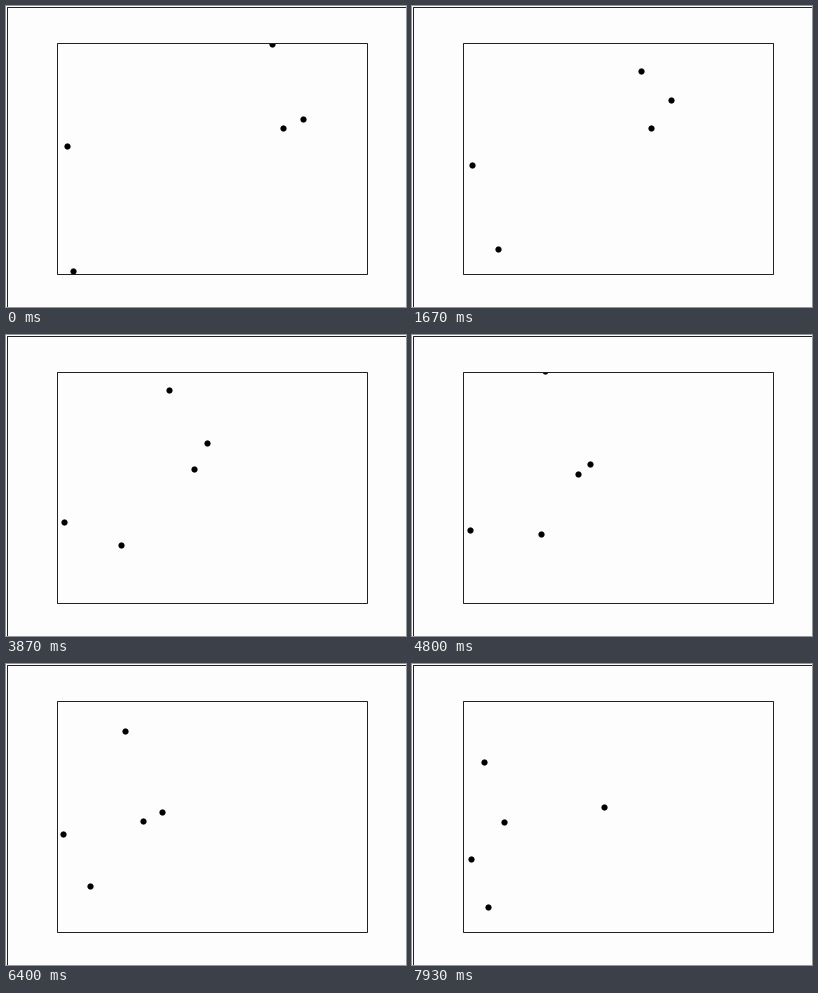
These frames come from a looping animation (400 by 301 pixels, 8 s). A matplotlib script:

```python
import numpy as np
import matplotlib.pyplot as plt
from matplotlib.animation import FuncAnimation
from matplotlib.patches import Rectangle

W, H, DPI = 400, 301, 64
FRAMES, LOOP_MS = 120, 8000
PAPER = "#fefdfe"


def pt(px):
    return px * 72 / DPI


# Straight flights between bounces: (step, position) for x and for y.
TRACKS = [
    ([(0, 265), (4.5, 261), (20, 228), (66, 127.8), (78, 139.5), (111, 69.5)],
     [(0, 37.5), (1, 36), (30.8, 80.5), (65.3, 34), (111, 98.5)]),
    ([(0, 296), (33, 233.5), (50, 200), (82.9, 147), (111, 193.5)],
     [(0, 112), (4.6, 113.8), (31.1, 79), (70, 137), (78, 139), (92, 150.6),
      (111, 142)]),
    ([(0, 276.5), (4.5, 264.2), (50, 187.5), (78, 142.5), (82.7, 147.8),
      (111, 89.5)],
     [(0, 121.5), (4.3, 116), (70, 141.1), (91, 158.5), (111, 157)]),
    ([(0, 60), (98, 56), (100.3, 50.7), (103.7, 58.3)],
     [(0, 139.5), (61.3, 197.4), (91, 166.8), (111, 195.5)]),
    ([(0, 66), (67.2, 131.7), (98, 61), (103.7, 60.8), (111, 77.5)],
     [(0, 264), (61.8, 196.2), (111, 243)]),
]


def sim_step(frame):
    """Simulation step on screen; playback stalls a few times early on."""
    if frame < 10:
        return min(frame, 1)
    if frame < 15:
        return 7
    if frame < 28:
        return min(frame - 5, 20)
    return frame - 7 if frame < 35 else frame - 8


def along(knots, step):
    return np.interp(step, *zip(*knots)) + 0.5


fig = plt.figure(figsize=(W / DPI, H / DPI), dpi=DPI, facecolor=PAPER)
ax = fig.add_axes([0, 0, 1, 1])
ax.set(xlim=(0, W), ylim=(H, 0))
ax.axis("off")

ax.plot([0.5, 0.5, W], [H, 0.5, 0.5], color="#222222", lw=pt(1))
box = Rectangle((50.5, 36.5), 310, 231, fill=False, ec="#222222",
                lw=pt(1), zorder=3)
ax.add_patch(box)
dots, = ax.plot([], [], "o", color="black", ms=pt(6.2), mew=0, snap=False)
dots.set_clip_path(box)


def draw(frame):
    step = sim_step(frame)
    dots.set_data([along(x, step) for x, _ in TRACKS],
                  [along(y, step) for _, y in TRACKS])
    return dots,


anim = FuncAnimation(fig, draw, frames=FRAMES, interval=LOOP_MS / FRAMES,
                     repeat=True, repeat_delay=0)
plt.show()
```
